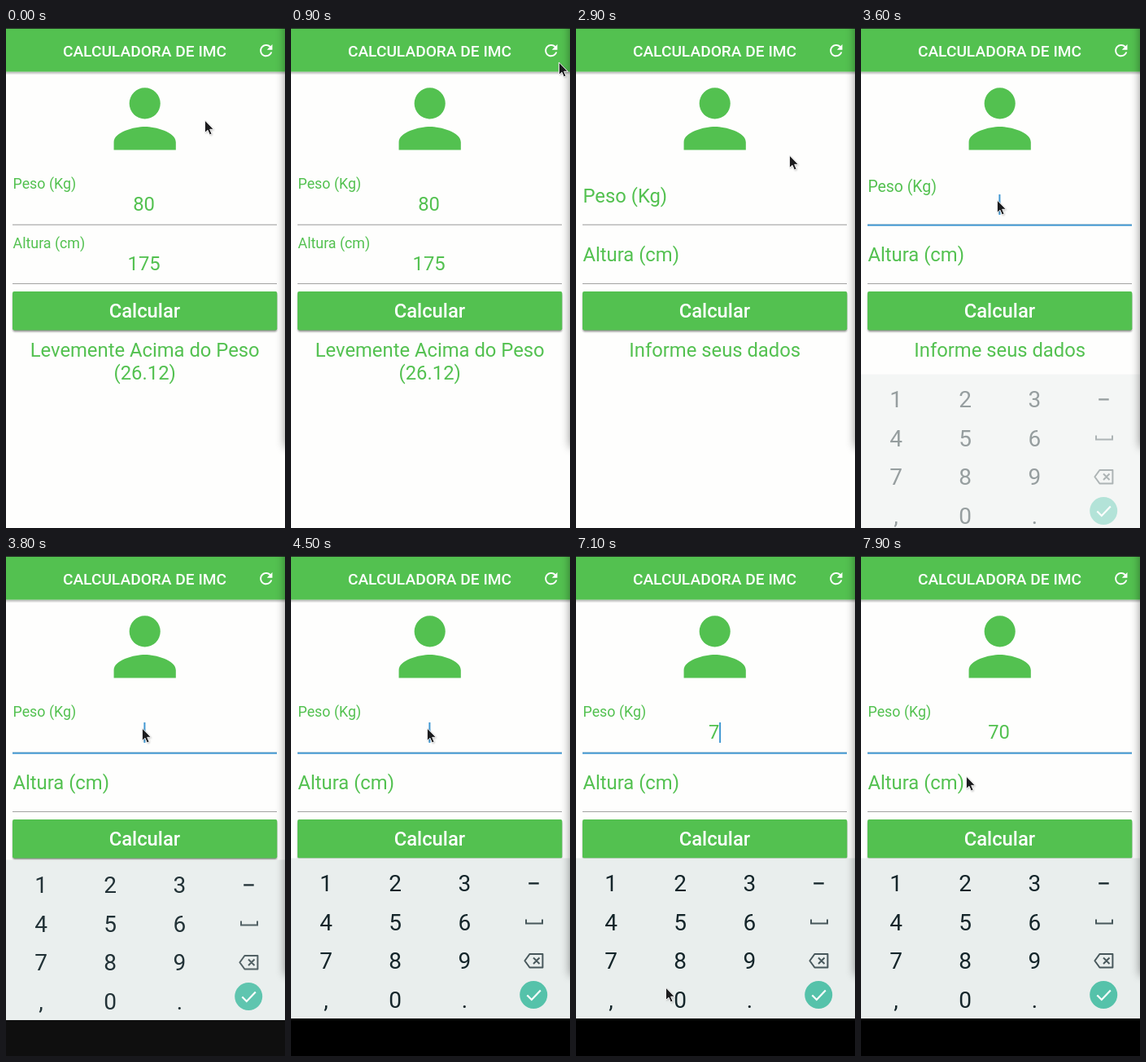
Write an HTML page that moves like this. It is 343x613 px and loops after 8 s.

```html
<!DOCTYPE html>
<html lang="pt">
<head>
<meta charset="utf-8">
<title>Calculadora de IMC</title>
<style>
  html, body { margin: 0; width: 100%; height: 100%; overflow: hidden; background: #fefefd; }
  svg { display: block; width: 343px; height: 613px; font-family: Roboto, sans-serif; }
  text { white-space: pre; }
  .green { fill: #53c150; }
  .big { font-size: 23.8px; }
  .mid { text-anchor: middle; }
  .key { font-size: 28px; fill: #14252a; text-anchor: middle; }
  .icon { fill: none; stroke: #47575b; stroke-width: 2; }
</style>
</head>
<body>
<svg viewBox="0 0 343 613">
  <defs>
    <linearGradient id="drop" x2="0" y2="1">
      <stop offset="0" stop-color="#000" stop-opacity=".3"/>
      <stop offset="1" stop-color="#000" stop-opacity="0"/>
    </linearGradient>
    <filter id="blur" x="-200%" width="500%" y="-10%" height="120%"><feGaussianBlur stdDeviation="6"/></filter>
    <filter id="soft" x="-10%" width="120%" y="-20%" height="150%"><feGaussianBlur stdDeviation="1"/></filter>
    <clipPath id="barClip"><rect y="1" width="343" height="53"/></clipPath>
    <path id="arrow" d="M0 0V15.5L3.6 12.3 6 18 8.7 16.9 6.3 11.3H11Z"/>
  </defs>

  <rect width="343" height="613" fill="#fefefd"/>

  <!-- app bar -->
  <rect y="53.6" width="343" height="4" fill="url(#drop)"/>
  <rect class="green" width="343" height="53.6"/>
  <rect width="343" height="1" fill="#253026"/>
  <circle id="ripple" cx="320" cy="28" fill="#fff" clip-path="url(#barClip)"/>
  <text class="mid" x="170.5" y="35" font-size="19.15" font-weight="500" fill="#fff">CALCULADORA DE IMC</text>
  <path transform="translate(308.4 16.2) scale(.953)" fill="#fff" d="M17.65 6.35C16.2 4.9 14.21 4 12 4c-4.42 0-7.99 3.58-7.99 8s3.57 8 7.99 8c3.73 0 6.84-2.55 7.73-6h-2.08c-.82 2.33-3.04 4-5.65 4-3.31 0-6-2.69-6-6s2.69-6 6-6c1.66 0 3.14.69 4.22 1.78L13 11h7V4z"/>

  <!-- person -->
  <path class="green" transform="translate(113.5 54.3) scale(4.766)" d="M12 12a4 4 0 1 0 0-8 4 4 0 0 0 0 8zm0 2c-2.67 0-8 1.34-8 4v2h16v-2c0-2.66-5.33-4-8-4z"/>

  <!-- fields -->
  <text id="weightLabel" class="green big">Peso (Kg)</text>
  <text id="heightLabel" class="green big">Altura (cm)</text>
  <rect x="8" y="240.7" width="325" height="1" fill="#9a9a9a"/>
  <rect id="focus" x="8" y="240.7" width="325" height="2" fill="#4298d2"/>
  <rect x="8" y="313" width="325" height="1" fill="#a2a2a2"/>
  <text id="weight" class="green big mid" x="169.6" y="224.3"></text>
  <text id="height" class="green big mid" x="169.6" y="297"></text>
  <rect id="caret" y="204" width="2" height="25" fill="#4298d2"/>

  <!-- button and result -->
  <rect x="8.5" y="325" width="324.5" height="47.2" rx="2" opacity=".45" filter="url(#soft)"/>
  <rect class="green" x="8" y="323" width="325.3" height="47.5" rx="2"/>
  <text class="big mid" x="170.4" y="355.2" font-weight="500" fill="#fff">Calcular</text>
  <text id="result1" class="green big mid" x="170.7" y="403"></text>
  <text id="result2" class="green big mid" x="170.7" y="431"></text>

  <g id="keyboard">
    <rect y="370.5" width="343" height="197" fill="#e9eeed"/>
    <rect y="567" width="343" height="60"/>
    <rect id="press" width="84" height="47" fill="#cfd7d7"/>
    <g id="keys"></g>
    <path d="M292.200 401.400h12.500" fill="none" stroke="#14252a" stroke-width="2.300"/>
    <path class="icon" d="M289 445.500v5h20v-5"/>
    <path class="icon" stroke-linejoin="round" d="M293.400 488h16v16.500h-16l-6-8.250zM298 492.500l7.500 7.500m0-7.500l-7.500 7.500"/>
    <circle cx="298.200" cy="538" r="17" fill="#55c2aa"/>
    <path d="M290.300 538.500l5.500 5.500 11-11.500" fill="none" stroke="#fff" stroke-width="2.200"/>
  </g>

  <rect x="343" y="-30" width="36" height="544" opacity=".42" filter="url(#blur)"/>

  <g id="mouse">
    <use href="#arrow" x="1" y="1.200" opacity=".25" filter="url(#soft)"/>
    <use href="#arrow" fill="#1c1c1e" stroke="#f4f4f4" stroke-width="1" stroke-linejoin="round"/>
  </g>
</svg>
<script>
const LOOP = 8000, STEP = 100;
const CLEAR = 2200, FOCUS = 3500, SEVEN = 6800, ZERO = 7400;
const el = id => document.getElementById(id);
const clamp = v => Math.min(1, Math.max(0, v));
const ramp = (t, from, to) => clamp((t - from) / (to - from));
const ease = (t, from, to) => {
  const p = ramp(t, from, to);
  return p * p * (3 - 2 * p);
};

const moves = [
  { to: [247, 133], from: 200, until: 500 },
  { to: [329, 42], from: 600, until: 900 },
  { to: [318, 25], from: 1100, until: 1800 },
  { to: [302, 59], from: 2300, until: 2600 },
  { to: [262, 156], from: 2700, until: 2900 },
  { to: [167, 211], from: 2900, until: FOCUS },
  { to: [67, 490], from: 5500, until: 6000 },
  { to: [43, 479], from: 6000, until: 6200 },
  { to: [110, 529], from: 6600, until: 7100 },
  { to: [129, 270], from: ZERO, until: 7900 }
];

function mouseAt(t) {
  return moves.reduce(([x, y], { to, from, until }) => {
    const p = ease(t, from, until);
    return [x + (to[0] - x) * p, y + (to[1] - y) * p];
  }, [244, 113]);
}

function set(id, attrs) {
  for (const name in attrs) el(id).setAttribute(name, attrs[name]);
}

["123", "456", "789", ",0."].forEach((row, r) => [...row].forEach((char, c) => {
  const key = document.createElementNS("http://www.w3.org/2000/svg", "text");
  key.setAttribute("class", "key");
  key.setAttribute("x", 43 + 85.2 * c);
  key.setAttribute("y", 411.2 + 47.5 * r);
  key.textContent = char;
  el("keys").append(key);
}));

function placeLabel(id, top, p) {
  set(id, { transform: `translate(8.5 ${top + 16.6 * (1 - p)}) scale(${1 - .25 * p})` });
}

function drawFields(t) {
  const sink = ease(t, CLEAR - 200, CLEAR + 100);
  placeLabel("weightLabel", 197, 1 - sink + ease(t, FOCUS - 100, FOCUS + 200));
  placeLabel("heightLabel", 269.5, 1 - sink);

  const full = t < CLEAR, covered = t >= FOCUS + 200;
  const typed = t < SEVEN ? "" : t < ZERO ? "7" : "70";
  el("weight").textContent = full ? "80" : typed;
  el("height").textContent = full ? "175" : "";
  el("result1").textContent = full ? "Levemente Acima do Peso" : covered ? "" : "Informe seus dados";
  el("result2").textContent = full ? "(26.12)" : "";

  // The caret blinks every 500 ms, counted from the last edit.
  const edit = [FOCUS, SEVEN, ZERO][typed.length];
  const lit = t >= FOCUS && Math.floor((t - edit) / 500) % 2 === 0;
  set("caret", { x: 169.4 + 6.7 * typed.length, opacity: +lit });
  set("focus", { opacity: +(t >= FOCUS) });
}

function drawKeyboard(t) {
  const left = 1 - ramp(t, FOCUS, FOCUS + 400);
  set("keyboard", { transform: `translate(0 ${128 * left ** 3})`, opacity: 1 - left ** 2 });

  const first = t < 7100, hit = first ? SEVEN : ZERO;
  set("press", {
    x: first ? 1 : 86,
    y: first ? 473 : 520,
    opacity: ramp(t, hit - 200, hit - 100) - ramp(t, hit, hit + 100)
  });
}

function draw(t) {
  const [x, y] = mouseAt(t);
  set("mouse", { transform: `translate(${x + .4} ${y})` });
  set("ripple", {
    r: 27 * ease(t, 1900, 2300),
    opacity: .25 * (ramp(t, 1900, 2200) - ramp(t, 2300, 2600))
  });
  drawFields(t);
  drawKeyboard(t);
}

const start = performance.now();
function tick(now) {
  const t = Math.max(0, now - start) % LOOP;
  draw(Math.floor(t / STEP) * STEP);
  requestAnimationFrame(tick);
}
draw(0);
requestAnimationFrame(tick);
</script>
</body>
</html>
```
